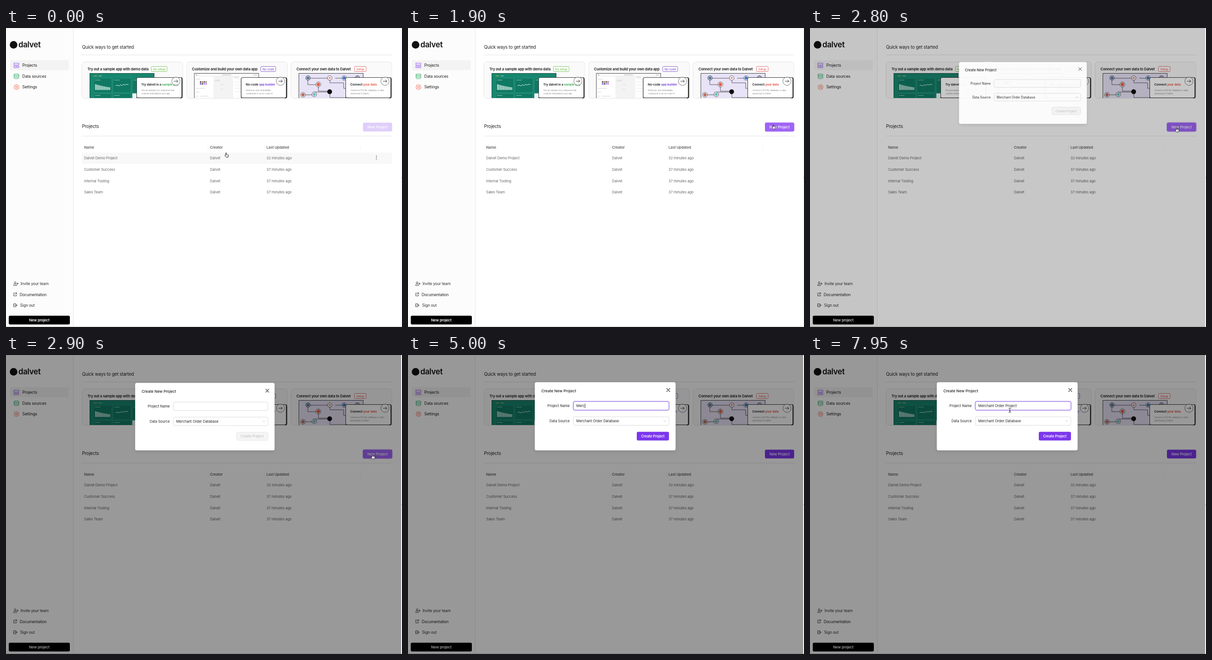
Recreate the animation shown at these times as an HTML page. Size 862x649 px, loop 8000 ms.

```html
<!DOCTYPE html>
<html lang="en">
<head>
<meta charset="utf-8">
<title>New project</title>
<style>
  html, body { margin: 0; width: 862px; height: 649px; overflow: hidden; background: #fff; }
  svg { display: block; font-family: Inter, sans-serif; }
  text { white-space: pre; }
  #page text { letter-spacing: -.02em; }
</style>
</head>
<body>
<svg id="stage" width="862" height="649" viewBox="0 0 862 649"></svg>
<script>
const PURPLE = '#7c37ed', INK = '#1f1f1f';

const rect = (x, y, w, h, fill, stroke = 'none', rx = 0, more = '') =>
  `<rect x="${x}" y="${y}" width="${w}" height="${h}" rx="${rx}" fill="${fill}" stroke="${stroke}" ${more}/>`;
const line = (d, stroke = '#e4e4e4', width = 1, fill = 'none') =>
  `<path d="${d}" stroke="${stroke}" stroke-width="${width}" fill="${fill}" stroke-linecap="round" stroke-linejoin="round"/>`;
const disc = (x, y, r, fill, stroke = 'none', width = 1) =>
  `<circle cx="${x}" cy="${y}" r="${r}" fill="${fill}" stroke="${stroke}" stroke-width="${width}"/>`;
// y is the middle of the capitals
const label = (x, y, str, size, fill = INK, weight = 400, anchor = 'start') =>
  `<text x="${x}" y="${(y + size * .36).toFixed(2)}" font-size="${size}" fill="${fill}" font-weight="${weight}" text-anchor="${anchor}">${str}</text>`;
const group = (id, body, more = '') => `<g id="${id}" ${more}>${body}</g>`;

function sidebar() {
  const gear = Array.from({ length: 48 }, (_, i) => {
    const a = i / 48 * 2 * Math.PI, r = 5 + .6 * Math.cos(8 * a);
    return `${(22.8 + r * Math.cos(a)).toFixed(2)} ${(128.3 + r * Math.sin(a)).toFixed(2)}`;
  }).join('L');
  const layer = y => `M17.5 ${y}v2.2c0 2 10.4 2 10.4 0v-2.2`;
  return rect(0, 0, 146, 649, '#fcfcfc') + line('M146.5 0V649', '#e6e6e6') +
    disc(16.5, 36.5, 8.3, '#111') + label(27, 36, 'dalvet', 16.9, '#111', 600) +
    rect(9, 70, 127.5, 21.5, '#f3f3f3', 'none', 3) +
    line('M17.5 76.3h10.4v4h-10.4zM17.5 82.6h4.4v3.6h-4.4zM24.2 82.6h3.7v3.6h-3.7z', '#9257ea', 1) +
    line(layer(101) + layer(103.7) + layer(106.4) + 'M17.5 101c0-2 10.4-2 10.4 0s-10.4 2-10.4 0', '#35ad6b', .95) +
    line(`M${gear}Z`, '#ef5b41', 1) + disc(22.8, 128.3, 2, 'none', '#ef5b41') +
    label(35.5, 81.2, 'Projects', 8.75) +
    label(35.5, 104.7, 'Data sources', 8.75) +
    label(35.5, 128.3, 'Settings', 8.75) +
    disc(19.8, 552.8, 1.9, 'none', '#333', .9) +
    line('M16.4 558.6c0-4 6.8-4 6.8 0zM25 553v3.6M23.2 554.8h3.6', '#333', .9) +
    line('M19 575.3h-2.2v6.2h6v-2.4M20.5 574.8h2.6v2.6M23 575l-3.6 3.6', '#333', .9) +
    line('M21.5 600.5v-2h-4.8v6.6h4.8v-2M19.5 601.8h4.6M22.6 600.2l1.6 1.6-1.6 1.6M17 601.8h1', '#333', .9) +
    label(31.7, 555.2, 'Invite your team', 8.45, '#333') +
    label(29.8, 578.8, 'Documentation', 8.45, '#222') +
    label(30.8, 602.4, 'Sign out', 8.45, '#333') +
    rect(6, 624.5, 133, 19, '#000', 'none', 3) +
    label(72.5, 634, 'New project', 7.95, '#fff', 600, 'middle');
}

function dashboardArt() {
  let s = rect(17.5, 25.5, 140, 56, '#17876f', '#17463d');
  for (const [x, y] of [[26, 36], [68, 36], [110, 36], [26, 69.5], [68, 69.5]])
    s += rect(x, y, 39, 31, '#107963', '#3f9f8a', 1, 'stroke-width=".5"') +
      line(`M${x + 3} ${y + 4}h11`, '#a9d9cc', .8);
  for (let i = 0; i < 14; i++) {
    const h = 12.5 * Math.exp(-i * .06);
    s += rect(29 + i * 2.4, 61.5 - h, 1.5, h, '#d8f0ea');
  }
  return s + line('M74 52l4-1 3 2 3-3 3 2 4-3 3 2 3-2 4 1', '#d8f0ea', 1) +
    line('M26 31h7', '#e8b84a', 1) + line('M37 31h6', '#b5ddd2', 1) + rect(110, 69, 10, 12, '#eef7f5');
}

function builderArt() {
  let s = rect(17.5, 25.5, 140, 56, '#fff', '#444') + line('M18 31.5H157', '#ddd', .7) +
    line('M78 28.8h19M147 28.8h6', '#888', .8) + line('M21 28.8h3', '#555', .8);
  for (const [x, y, w] of [[21, 38, 9], [21, 58, 13], [21, 66, 7], [30, 75, 18], [21, 75, 5], [34, 58, 6]])
    s += line(`M${x} ${y}h${w}`, '#c4c4c4', .8);
  for (let i = 0; i < 4; i++)
    s += rect(29.5 + i * 4, 43, 3, 2.4, ['#222', '#a33', '#222', '#666'][i]) +
      rect(29.5 + i * 4, 47, 3, 2.4, ['#6236c9', '#222', '#8b5cf6', '#c04ad0'][i]);
  s += rect(59, 32, 43, 49, '#f3f3f3') + rect(62, 39, 11, 4, '#e4e4e4');
  for (let i = 0; i < 5; i++) s += line(`M105 ${37 + i * 7}h${36 - i * 2}`, '#e2e2e2', .8);
  return s + line('M74 50h8M74 60h6M124 35v40', '#d4d4d4', .8) + line('M104 34h10', '#aaa', .8);
}

function networkArt() {
  return rect(17.5, 25.5, 140, 56, '#e8e3f7', '#444') +
    line('M37 36v14h18M37 36h48v10h30V58h5M60 50v14h25M85 65v13h35M27 72h24v-6h34M97 36h20', '#333', .8) +
    disc(37.5, 35.5, 5, '#aebdd0', '#333', .8) + disc(37.5, 35.5, 2.6, '#496d96') +
    disc(84.7, 35.5, 5, '#fff', '#333', .8) + disc(84.7, 35.5, 2.5, '#e8a09b') +
    disc(116, 35.5, 5, '#fff', '#333', .8) + disc(116, 35.5, 3.3, '#3d72c9') +
    disc(145, 35.5, 5, '#b3acc4', '#333', .8) +
    disc(60, 49.5, 5.5, '#fff', '#333', .8) + disc(60, 49.5, 3.7, '#ec5b43') +
    disc(84.5, 65.3, 5.2, '#0d0d0d') +
    disc(26.5, 72, 5.2, '#fff', '#333', .8) + disc(26.5, 72, 3.4, '#ba6b5a') +
    disc(51, 71, 5.2, '#fff', '#333', .8) + disc(51, 71, 3.3, '#66bfc3');
}

function card(x, title, badge, badgeX, badgeW, color, art, lead, accent, tint, small) {
  return `<g transform="translate(${x} 73)" clip-path="url(#cardClip)">` +
    rect(.5, .5, 219.6, 79, '#fafafa', '#e3e3e3', 6) +
    label(12.3, 16.2, title, 7.8, '#1c1c1c', 600) +
    rect(badgeX, 10.5, badgeW, 11, '#fff', color, 2, 'stroke-width=".8"') +
    label(badgeX + badgeW / 2, 16.2, badge, 6.5, color, 400, 'middle') +
    art + rect(119.5, 34.5, 99.3, 60, '#222', '#222', 3) + rect(119.5, 34.5, 98, 44, '#fff', '#333', 3) +
    label(129.5, 49.2, `${lead} <tspan fill="${tint}">${accent}</tspan>`, 6.7, '#1c1c1c', 600) +
    small.map((s, i) => label(129.8, 62.5 + i * 6.7, s, 4.3, '#888')).join('') +
    disc(205, 42.5, 9, 'rgba(255,255,255,.72)', '#666', .9) +
    line('M201 42.5h8M206 39.3l3.2 3.2-3.2 3.2', '#444', 1) +
    line('M6 79.5H214', '#e3e3e3') + '</g>';
}

function table() {
  const rows = [['Dalvet Demo Project', 32], ['Customer Success', 37], ['Internal Tooling', 37], ['Sales Team', 37]];
  return group('rowHover', rect(165, 270.5, 675.5, 24.7, '#f8f8f8') +
      [278, 281.3, 284.6].map(y => disc(806.3, y, .9, '#555')).join('')) +
    [[170, 'Name'], [444, 'Creator'], [567, 'Last Updated']].map(([x, s]) => label(x, 259.3, s, 7.95, '#666', 600)).join('') +
    line('M439.5 253.5v11M562.5 253.5v11M771.5 253.5v11', '#f2f2f2') +
    rows.map(([name, age], i) => {
      const y = 282.4 + i * 24.7;
      return label(170, y, name, 7.85, '#6a6a6a') + label(444, y, 'Dalvet', 7.85, '#6a6a6a') +
        label(567, y, age + ' minutes ago', 7.85, '#6a6a6a');
    }).join('');
}

const page = rect(0, 0, 862, 649, '#fff') + sidebar() +
  label(165.5, 41.5, 'Quick ways to get started', 9.75, '#222') + line('M165.5 58.5H840.5') +
  card(165, 'Try out a sample app with demo data', 'No setup', 151.5, 34, '#67bd3f', dashboardArt(),
    'Try dalvet in a', 'sample app', '#36a853', ['See an example of a component that', 'could be embedded in your app.']) +
  card(392.5, 'Customize and build your own data app', 'No code', 162, 32.5, '#7043c4', builderArt(),
    'No-code', 'app builder', '#7440d8', ['Build your own embeddable', 'component in our no-code UI.']) +
  card(620, 'Connect your own data to Dalvet', 'Setup', 138.5, 25.5, '#d9534f', networkArt(),
    'Connect', 'your data', '#ea4b35', ['Connect a CSV file, database, or data', 'warehouse to Dalvet.']) +
  label(165.5, 213.5, 'Projects', 10, '#222') + line('M165.5 234.5H840.5') + table() +
  group('newButton', rect(777, 205.5, 63.5, 19, PURPLE, 'none', 3) +
    group('newHover', rect(777, 205.5, 63.5, 19, '#a066f7', 'none', 3)) +
    group('newPressed', rect(776.5, 205, 64.5, 20, 'none', '#c6a4fa', 3.5)) +
    label(808.7, 214.8, 'New Project', 7.9, '#fff', 500, 'middle')) +
  line('M0 .5H862', '#e6e6e6') + line('M0 648.5H862', '#c9c9c9') + line('M860.5 0V649', '#ececec');

const modal = rect(276, 59, 306.5, 148, '#fff', 'none', 4, 'filter="url(#shadow)"') +
  label(290.3, 78, 'Create New Project', 8.2, '#222', 500) +
  line('M563 72.5l7 7M570 72.5l-7 7', '#333', 1.1) +
  label(352, 110.5, 'Project Name', 7.6, '#222', 400, 'end') +
  label(352, 143.4, 'Data Source', 7.6, '#222', 400, 'end') +
  rect(360, 101, 208, 18.5, '#fff', '#d9d9d9', 3) +
  group('focus', rect(359.5, 100.5, 209, 19.5, 'none', '#e2d5fa', 3.5, 'stroke-width="2.4"') +
    rect(360, 101, 208, 18.5, '#fff', '#8a5be0', 3)) +
  rect(360, 134, 208, 18.5, '#fff', '#dcdcdc', 3) +
  label(366.3, 143.4, 'Merchant Order Database', 7.6, '#222') +
  line('M556.5 142l2.4 2.6 2.4-2.6', '#c4c4c4', .9) +
  rect(498.5, 167, 69.5, 18, '#f5f5f5', '#e6e6e6', 3) +
  label(533, 176.3, 'Create Project', 7.5, '#bdbdbd', 400, 'middle') +
  group('createOn', rect(498, 166.7, 70, 18.8, PURPLE, 'none', 3) +
    label(533, 176.3, 'Create Project', 7.4, '#fff', 600, 'middle')) +
  label(366.3, 110.5, '', 7.6, '#222').replace('<text', '<text id="typed"') +
  '<rect id="caret" y="105.5" width=".9" height="10" fill="#222"/>';

const cursors =
  group('arrow', '<path d="M-2.8-5v9l2.1-1.8 1.4 3.2 1.6-.7-1.4-3.1H3.6z" fill="#000" stroke="#fff" stroke-width=".8"/>') +
  group('hand', '<path d="M-2.3-4.2c0-1.3 1.7-1.3 1.7 0V-1c.3-.8 1.5-.7 1.6.1.4-.6 1.4-.4 1.5.4.5-.5 1.5-.2 1.5.7V2.2C4 4 3 5 1.2 5h-1C-1.2 5-2 4-4 1.2c-.6-1 .7-1.8 1.7-.4z" fill="#fff" stroke="#111" stroke-width=".9"/>' +
    line('M.3 1.6v1.7M1.7 1.6v1.7', '#111', .5)) +
  group('beam', line('M-2.4-4.6Q0-4.6 0-3.4Q0-4.6 2.4-4.6M0-3.4V3.4M-2.4 4.6Q0 4.6 0 3.4Q0 4.6 2.4 4.6M-1.2 1.5H1.2', '#222', .9));

document.getElementById('stage').innerHTML =
  `<defs><clipPath id="cardClip"><rect width="220.6" height="80" rx="6"/></clipPath>
   <filter id="shadow" x="-20%" y="-20%" width="140%" height="150%"><feDropShadow dx="0" dy="3" stdDeviation="4" flood-opacity=".1"/></filter></defs>` +
  group('page', page) + group('mask', rect(0, 0, 860, 649, '#000')) +
  line('M861.5 323.5v3', '#bbb', .8) + group('modal', modal) + group('cursor', cursors);

const el = id => document.getElementById(id);
const clamp = v => Math.max(0, Math.min(1, v));
const ramp = (t, from, to) => { const x = clamp((t - from) / (to - from)); return x * x * (3 - 2 * x); };
const show = (id, opacity) => el(id).setAttribute('opacity', +opacity);

const PATH = [[0, 480.5, 276], [850, 587, 187], [1050, 590, 183], [1750, 796, 214], [2500, 799.5, 222],
  [2950, 799, 221], [3400, 435, 120], [8000, 435, 120]];
const NAME = 'Merchant Order Project';
const KEYS = [4350, 4750, 4900, 5000, 5100, 5200, 5250, 5300, 5400, 5650, 5800,
  5900, 6000, 6100, 6500, 6650, 6900, 6950, 7050, 7150, 7200, 7400];

function cursorAt(t) {
  const i = PATH.findIndex(p => p[0] > t), [t0, x0, y0] = PATH[i - 1], [t1, x1, y1] = PATH[i];
  const k = ramp(t, t0, t1);
  return [x0 + (x1 - x0) * k, y0 + (y1 - y0) * k];
}

function draw(t) {
  show('rowHover', 1 - ramp(t, 100, 300));
  show('newButton', .24 + .76 * ramp(t, 20, 260));
  show('newHover', ramp(t, 1720, 1920) - ramp(t, 3000, 3200));
  show('newPressed', ramp(t, 2750, 2800) - ramp(t, 2800, 3200));
  show('mask', .4 * ramp(t, 2705, 2885));

  const scale = 1 - .095 * Math.exp((2800 - t) * .0224);
  const open = t > 2755;
  show('modal', open ? clamp((t - 2750) / 54) : 0);
  if (open) el('modal').setAttribute('transform', `translate(797 218) scale(${scale}) translate(-797 -218)`);
  show('focus', ramp(t, 3450, 3650));
  show('createOn', ramp(t, 4350, 4550));

  const typed = el('typed');
  typed.textContent = NAME.slice(0, KEYS.filter(k => k <= t).length);
  el('caret').setAttribute('x', 366.5 + typed.getComputedTextLength());
  show('caret', t >= 3500 && t < 7800);

  const shape = t < 100 ? 'hand' : t < 1750 ? 'arrow' : t < 3010 ? 'hand' : t < 3350 ? 'arrow' : 'beam';
  for (const id of ['arrow', 'hand', 'beam']) show(id, id === shape);
  show('cursor', t < 4350 || t >= 7800);
  el('cursor').setAttribute('transform', `translate(${cursorAt(t)})`);
}

function tick() {
  draw(performance.now() % 8000);
  requestAnimationFrame(tick);
}
tick();
</script>
</body>
</html>
```
